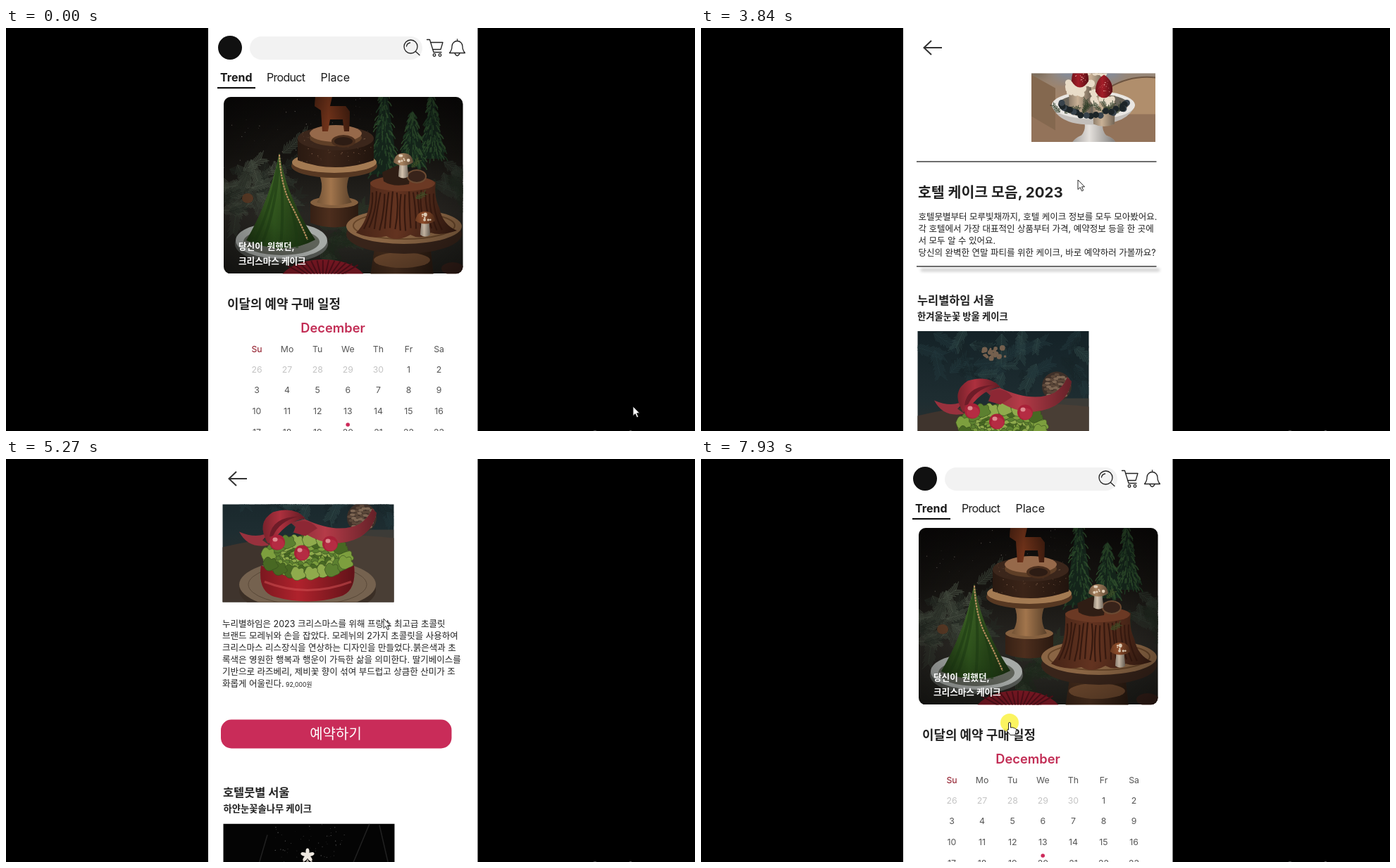
Write an HTML page that moves like this. It is 978 px wide and 573 px high and loops after 8000 ms.

```html
<!DOCTYPE html>
<html lang="ko">
<head>
<meta charset="utf-8">
<title>Cake app walkthrough</title>
<style>
html, body { margin: 0; width: 100%; height: 100%; overflow: hidden; background: #000; }
svg { display: block; }
text { font-family: Inter, "Noto Sans CJK KR", "Noto Sans CJK", sans-serif; white-space: pre; }
.script { font-family: "Liberation Serif", serif; font-style: italic; }
</style>
</head>
<body>
<svg id="stage" width="978" height="573" viewBox="0 0 978 573"></svg>
<script>
let seed = 7;
const rnd = (a = 0, b = 1) => {
  seed = (seed * 16807) % 2147483647;
  return a + (b - a) * seed / 2147483647;
};
const many = (n, make) => Array.from({ length: n }, (_, i) => make(i)).join('');

// Drawing helpers
const rect = (x, y, w, h, fill, more = '') =>
  `<rect x="${x}" y="${y}" width="${w}" height="${h}" fill="${fill}" ${more}/>`;
const oval = (x, y, rx, ry, fill, more = '') =>
  `<ellipse cx="${x}" cy="${y}" rx="${rx}" ry="${ry}" fill="${fill}" ${more}/>`;
const shape = (d, fill, more = '') => `<path d="${d}" fill="${fill}" ${more}/>`;
const lit = (d, fill) => shape(d, fill) + shape(d, 'url(#shade)');
const line = (d, stroke, width = 1, more = '') =>
  `<path d="${d}" fill="none" stroke="${stroke}" stroke-width="${width}" ${more}/>`;
const text = (x, y, size, str, weight = 400, fill = '#222', more = '') =>
  `<text x="${x}" y="${y}" font-size="${size}" font-weight="${weight}" fill="${fill}" ${more}>${str}</text>`;
const lines = (x, y, size, rows, weight, fill, step = 17) =>
  rows.map((row, i) => text(x, y + i * step, size, row, weight, fill)).join('');
const frame = (x, y, w, h, body) =>
  `<svg x="${x}" y="${y}" width="${w}" height="${h}" viewBox="${x} ${y} ${w} ${h}">${body}</svg>`;
const gradient = (id, ...colors) =>
  `<linearGradient id="${id}" x2="0" y2="1">${colors.map((c, i) =>
    `<stop offset="${i / (colors.length - 1)}" stop-color="${c}"/>`).join('')}</linearGradient>`;
const dots = (n, x, y, w, h, r, fill) =>
  many(n, () => { const s = rnd(.3, 1) * r; return oval(rnd(x, x + w), rnd(y, y + h), s, s, fill); });

// A fir sprig: needles leaning forward along a twig
function sprig(x, y, length, angle, color) {
  const needle = Math.min(14, length * .45);
  let d = `M${x} ${y}l${length * Math.cos(angle)} ${length * Math.sin(angle)}`;
  for (let s = 0; s < length; s += 2.5) {
    for (const side of [-.7, .7]) {
      const n = rnd(.6, 1) * needle;
      d += `M${x + s * Math.cos(angle)} ${y + s * Math.sin(angle)}l${n * Math.cos(angle + side)} ${n * Math.sin(angle + side)}`;
    }
  }
  return line(d, color, .9);
}
const sprigs = (n, x, y, w, h, colors) =>
  many(n, i => sprig(rnd(x, x + w), rnd(y, y + h), rnd(20, 45), rnd(-1, 2.2), colors[i % colors.length]));

// A slim fir with drooping tufts
function pine(x, top, half, bottom) {
  const tufts = tone => line(many(75, () => {
    const u = rnd(.04, 1), dx = rnd(-1, 1);
    return `M${x + dx * half * u} ${top + (bottom - top) * u}q${dx * 4} 2 ${dx * 6} 7`;
  }), tone, 1.4);
  return shape(`M${x} ${top}Q${x + half * .6} ${(top + bottom) / 2} ${x + half} ${bottom}h${-2 * half}Q${x - half * .6} ${(top + bottom) / 2} ${x} ${top}z`, '#14241a') +
    tufts('#1e3822') + tufts('#2b4829');
}

const mushroom = (x, y, cap) =>
  lit(`M${x - 5} ${y}l-2 24q7 5 14 0l-2-24z`, '#d3c2ae') +
  lit(`M${x - 14} ${y + 4}q2-13 14-13t14 13q-14 9-28 0z`, cap) + dots(8, x - 9, y - 6, 18, 9, 2.6, '#e2cfb8');

const hero = () => `<g clip-path="url(#heroClip)">` +
  rect(309, 98, 340, 251, 'url(#night)') +
  dots(60, 309, 98, 210, 110, .7, '#6b655e') +
  pine(605, 92, 18, 186) + pine(537, 66, 19, 208) + pine(577, 116, 20, 198) +
  sprigs(40, 296, 175, 100, 95, ['#363d33', '#242a23', '#464d41']) +
  sprigs(10, 605, 190, 40, 50, ['#2c342b', '#20281f']) +
  sprigs(16, 440, 280, 55, 50, ['#2a3626', '#1d271b']) +
  oval(343, 242, 8, 7, '#563824') +
  // Cake stand with chocolate cake and deer topper
  lit('M432 248v29q34 13 68 0v-29z', '#4d2e1d') + oval(466, 248, 34, 8, '#85603f') +
  lit('M442 203q13 24-1 45q25 8 50 0q-14-21 0-45z', '#a2754c') +
  oval(466, 196, 61, 17, '#573822') + oval(466, 191, 60, 15, '#a37a52') +
  lit('M414 156v32q53 20 108 0v-32z', '#3b2418') + oval(468, 157, 54, 17, '#3b261b') +
  dots(60, 420, 146, 98, 45, .7, '#7d5d47') +
  oval(468, 156, 37, 12, '#5f3f27') + oval(468, 150, 37, 12, '#96694a') +
  oval(479, 161, 17, 9, '#4a2e1d') + oval(479, 161, 13, 6, '#2d1c14') +
  lit('M439 98h24l-3 13h22l6 8-1 28h-7l-2-17h-18l-3 17h-8l-2-30-9-6z', '#71331a') +
  // Green cone cake
  oval(391, 307, 66, 27, '#555854') + oval(391, 302, 65, 26, '#a6aaa7') + oval(391, 304, 54, 19, '#5e6259') +
  lit('M388 177q9 62 51 124q-44 24-98 1q34-58 47-125z', 'url(#cone)') +
  line('M387 190q-3 66-24 118M390 200q5 67-1 117M385 200q-9 58-33 106M397 230q17 48 16 83', '#1c3a13', 4, 'opacity=".55"') +
  line('M388 180q2 43 16 70t24 51', '#b58d5e', 2.2, 'stroke-dasharray="3 1"') +
  // Log cake on a wood slice
  lit('M524 308h78l5 45h-90z', '#4c301f') + oval(562, 330, 40, 11, '#6b472d') +
  oval(565, 293, 82, 28, '#38241a') + oval(565, 282, 82, 25, '#8a6544') +
  oval(565, 281, 72, 19, 'none', 'stroke="#664529" stroke-width="2"') +
  lit('M517 219q46-19 93 0q-3 20 5 37q5 24 25 32q-24 8-37 3q-14 11-29 3q-20 11-34 2q-23 5-43-5q22-20 20-72z', '#633320') +
  oval(563, 221, 46, 11, '#6b3924') +
  line(many(16, i => `M${520 + i * 5.8} ${233 + rnd(-4, 4)}q${rnd(-5, 5)} 25 ${(i - 7.5) * 1.6} 52`), '#36190f', 2.2) +
  shape('M534 205l22-10 18 10-2 17q-22 5-36-4z', '#2f1d14') +
  oval(583, 211, 13, 9, '#38231a', 'stroke="#6c4a32" stroke-width="2"') +
  sprig(582, 242, 15, -.5, '#405229') + sprig(576, 198, 14, -.8, '#405229') +
  mushroom(564, 187, '#a8825f') + mushroom(595, 270, '#93502d') +
  oval(634, 342, 16, 9, '#38211a') +
  oval(450, 366, 64, 37, '#7d1824') +
  line(many(13, i => `M450 366L${400 + i * 8.3} ${338 - 8 * Math.sin(i / 4)}`), '#530f19', 2) +
  rect(309, 98, 340, 251, 'url(#vignette)') +
  lines(330, 314.5, 12.6, ['당신이  원했던,', '크리스마스 케이크'], 700, '#fff', 21.5) + '</g>';

function calendar() {
  const x = i => 356 + 43.1 * i;
  const cell = (i, y, str, fill) => text(x(i), y, 12.3, str, 400, fill, 'text-anchor="middle"');
  let out = text(464, 432.5, 18.3, 'December', 600, '#c22d55', 'text-anchor="middle"');
  ['Su', 'Mo', 'Tu', 'We', 'Th', 'Fr', 'Sa'].forEach((day, i) => { out += cell(i, 460.5, day, i ? '#555' : '#8c1020'); });
  for (let n = 0; n < 28; n++) {
    const past = n < 5;
    out += cell(n % 7, 489.5 + 29.8 * Math.floor(n / 7), past ? 26 + n : n - 4, past ? '#c4c4c4' : '#555');
  }
  return out + oval(485.2, 564, 2.8, 2.8, '#cd2a5a');
}

const home = () =>
  oval(318, 28, 17, 17, '#111') +
  rect(346, 12, 245, 33, '#f2f2f2', 'rx="16.5"') +
  `<g fill="none" stroke="#222" stroke-width="1.3" stroke-linecap="round" stroke-linejoin="round">
    <circle cx="574.5" cy="26.5" r="9.5"/><path d="M581.5 33.5l5.5 5M568.5 26a6 6 0 0 1 5-5"/>
    <path d="M597.5 16.5h4l5.5 18h11M602.5 20.5h17.5l-3 10h-11.5"/>
    <circle cx="608" cy="38.5" r="1.8"/><circle cx="616" cy="38.5" r="1.8"/>
    <path d="M629.5 35.5q3.5-4 3.5-9.5a7.5 7.5 0 0 1 15 0q0 5.5 3.5 9.5zM637 36q3.5 7 7 0M640.5 16v2"/></g>` +
  text(304, 75.5, 16, 'Trend', 700, '#1b1b1b') +
  text(370, 75.5, 16, 'Product', 400, '#1b1b1b', 'letter-spacing="-.7"') +
  text(446.5, 75.5, 16, 'Place', 400, '#1b1b1b') +
  rect(300, 84, 54, 2.2, '#111') + hero() +
  text(314, 398.5, 17.9, '이달의 예약 구매 일정', 700) + calendar();

const plate = (x, y, rx, ry) => oval(x, y + 3, rx, ry, '#3c1816') + oval(x, y, rx, ry, '#d5cec5') + oval(x, y, rx * .74, ry * .72, '#b5aaa0');
const toast = (x, y) => lit(`M${x - 18} ${y}l8-13h23l5 13-9 11h-21z`, '#5a301d') + dots(6, x - 12, y - 10, 25, 10, 4, '#932627') +
  oval(x - 7, y - 11, 5, 4, '#1f1411') + oval(x + 7, y - 11, 5, 4, '#1f1411');
const goblet = (x, y) => lit(`M${x - 11} ${y}h22q1 17-8 20l-1 11h5v3h-14v-3h5l-1-11q-9-4-8-20z`, '#b08844') + oval(x, y, 11, 4, '#c9a964');
const mug = (x, y) => oval(x, y + 19, 20, 6, '#aca096') + lit(`M${x - 15} ${y}h30l-4 20h-22z`, '#e2dacf') + dots(14, x - 13, y - 9, 26, 11, 5, '#c49c50');
const cushionText = (x, y, size, turn, str) => text(x, y, size, str, 400, '#e5ddd0', `class="script" transform="rotate(${turn} ${x} ${y})"`);

const partyPhoto = () => frame(308.5, 56, 243, 163,
  rect(308, 56, 244, 164, '#3b1a18') +
  rect(308, 118, 244, 102, '#5f1a1c') + rect(308, 118, 244, 102, 'url(#plaid)') +
  shape('M366 56h116v62h-116z', '#47302c') + rect(366, 56, 116, 62, 'url(#plaid)') +
  shape('M308 60h54l3 57q-25 16-57 9z', '#12352a') + shape('M506 60h46v63q-36 5-57-12z', '#751420') +
  shape('M488 56h18l-8 44h-12z', '#94877f') + rect(385, 66, 3, 58, '#8d2526') + rect(484, 64, 3, 60, '#a33a32') +
  cushionText(318, 109, 17, -9, 'lalala') + cushionText(513, 91, 14, 22, 'Holiday') +
  lit('M416 66h9v22q5 5 5 12v28h-20v-28q0-7 6-12z', '#1b211d') + rect(415, 64, 11, 14, '#a22b2b') + rect(411, 104, 18, 14, '#b5a28f') +
  lit('M452 80l12 53h-25z', '#bd984c') + line('M447 101l12 5M444 112l16 5M442 123l20 5', '#6f501f', 2) +
  goblet(340, 102) + goblet(529, 130) +
  dots(16, 360, 140, 150, 20, 7, '#8b6d37') +
  plate(430, 142, 31, 15) + oval(430, 142, 21, 9, '#73502b') +
  oval(380, 160, 23, 15, '#2f3b22') + dots(26, 361, 148, 40, 23, 4, '#8d2c2c') + dots(14, 361, 148, 40, 23, 3, '#8d8a55') +
  plate(487, 162, 24, 14) + dots(34, 470, 152, 34, 20, 4, '#96302a') + dots(12, 470, 152, 34, 20, 3, '#d3c2ae') +
  oval(436, 176, 38, 14, '#2c2f1d') + sprigs(15, 400, 165, 42, 16, ['#474a2b', '#26351f']) +
  dots(16, 405, 164, 60, 22, 4, '#a32b2a') + oval(433, 167, 11, 10, '#d57a27') + oval(433, 164, 5, 5, '#ffd86b') +
  mug(333, 165) + mug(537, 168) +
  plate(322, 205, 20, 15) + plate(372, 201, 31, 18) + plate(440, 209, 29, 15) + plate(500, 199, 31, 18) + plate(547, 205, 19, 14) +
  toast(371, 201) + toast(500, 200) + lit('M423 211l8-11 26 5-4 12z', '#b08a57'));

const berryCake = (x, y) =>
  lit(`M${x - 16} ${y + 14}l1 40q15 7 30 0l1-40z`, '#c9b196') +
  dots(26, x - 17, y + 10, 34, 17, 6, '#e9dcc8') +
  lit(`M${x} ${y - 16}q13 8 12 24q-5 9-12 9t-12-9q0-17 12-24z`, '#a31d28') + dots(18, x - 8, y - 8, 16, 18, .8, '#e9aaa0');

const berryPhoto = () => frame(469, 409.5, 176, 176,
  rect(469, 409, 176, 177, 'url(#dusk)') +
  `<g filter="url(#blur)">${rect(505, 400, 90, 95, '#7f8ea6')}${rect(462, 400, 26, 90, '#5e5242')}${rect(520, 400, 60, 22, '#4d4a38')}${rect(612, 400, 40, 88, '#988c82')}</g>` +
  `<g opacity=".5">${dots(34, 505, 411, 90, 44, 4, '#d6b45e')}</g>` +
  shape('M580 508q26-19 66-14v92h-66z', '#b08e6c') + rect(469, 546, 176, 40, '#93735a') +
  shape('M469 490l34 19v60l-34-20z', '#84684f') + line('M580 508q30-18 66-14', '#6d5541', 2) +
  lit('M543 553h29q-5 14 3 23q13 5 14 12h-63q3-7 14-12q8-9 3-23z', '#e4e0dc') +
  shape('M498 533h118q-9 27-59 28t-59-28z', '#c3bfbb') +
  oval(557, 533, 59, 20, '#e9e6e2') + oval(557, 532, 50, 15, '#6b655a') +
  berryCake(556, 461) + berryCake(538, 491) + berryCake(572, 506) +
  many(11, () => sprig(rnd(505, 595), rnd(536, 546), 14, rnd(-2.6, -.4), '#33402b')) +
  many(22, i => oval(557 + rnd(43, 52) * Math.cos(i * .15), 530 + rnd(12, 19) * Math.sin(i * .15), 4.5, 4.5, i % 3 ? '#1d2528' : '#38434c')));

function leaves(x, y, n) {
  return many(n, i => {
    const a = i * 2.4, r = Math.sqrt(i / n), tone = ['#5c8030', '#7d9f3e', '#486823', '#8fab4c'][i % 4];
    return shape(`M${x + 58 * r * Math.cos(a)} ${y + 25 * r * Math.sin(a)}q5-15 12-6q8-4 7 5q7 6-3 9q-12 8-16-8z`, tone, 'stroke="#33491c" stroke-width=".6"');
  });
}
const bauble = (x, y) => oval(x, y, 11, 11, '#a82138') + oval(x + 1, y + 2, 9, 8, '#b52c43') + oval(x - 3, y - 4, 3.5, 3, '#df8a90');

const potPhoto = () => frame(307.5, 854.5, 243, 198.5,
  rect(307, 854, 244, 200, 'url(#teal)') +
  sprigs(36, 300, 846, 240, 75, ['#22373b', '#2d4444', '#182529']) +
  shape('M307 975q110-27 244-13v92h-244z', '#3f342d') + rect(480, 950, 71, 103, '#51453b', 'opacity=".6"') +
  dots(24, 400, 878, 32, 16, 4, '#75604e') +
  oval(505, 933, 21, 21, '#3d2f28') + many(40, i => oval(505 + 2.8 * Math.sqrt(i) * Math.cos(i * 2.4), 933 + 2.8 * Math.sqrt(i) * Math.sin(i * 2.4), 3.5, 2, i % 2 ? '#7d6653' : '#5b4739')) +
  oval(428, 1036, 97, 37, '#3b2f26') + oval(428, 1028, 97, 36, '#75624f') + oval(428, 1028, 84, 29, 'none', 'stroke="#594838"') +
  lit('M362 1001q65 28 132 0q4 37-20 44q-45 14-94 0q-23-8-18-44z', '#b0222c') +
  line('M367 1024q60 24 123 0', '#d85658', 3, 'opacity=".5"') +
  leaves(417, 988, 100) +
  shape('M331 953q28 12 46-2l-13 14 10 7q-30 6-43-19z', '#98313d') +
  lit('M372 970q-18-30 7-45q30-9 46 9q-24 3-42 27z', '#ad303e') + shape('M374 960q3-28 42-29q-28 7-37 28z', '#6d1c28') +
  lit('M424 935q47 22 78 7q13-9 18-22l6 6q-7 38-53 43q-35 2-69-29z', '#b53b48') +
  shape('M413 940q17-7 29 8l-17 11-17-5z', '#8d2734') +
  bauble(385, 968) + bauble(420, 983) + bauble(460, 970));

function creamTree() {
  let out = shape('M428 1418L366 1545h124z', '#a79f95');
  for (let row = 9; row >= 0; row--) {
    const y = 1421 + row * 13.5, half = 5 + row * 6, n = 2 + row;
    for (let i = 0; i <= n; i++) {
      const u = i / n * 2 - 1, x = 428 + u * half;
      out += shape(`M${x} ${y}q${-9 - row * .4 + u * 6} 12 ${u * 9} 23q${11 + row * .4} -10 ${-u * 9} -23z`,
        (i + row) % 3 ? '#e7e1d8' : '#c8c0b6', 'stroke="#8c857d" stroke-width=".7"');
    }
  }
  return out;
}

const treePhoto = () => frame(308.5, 1368, 243, 243,
  rect(308, 1368, 244, 244, '#040404') +
  line('M371 1384L337 1500M486 1440L516 1368M530 1370l22 95', '#343434', 1.5, 'opacity=".6"') +
  dots(60, 375, 1368, 110, 60, .7, '#5c5c5c') +
  many(5, i => oval(428, 1540, 72 + i * 11, 13 + i * 3, 'none', 'stroke="#444" stroke-width=".7"')) +
  creamTree() +
  many(5, i => oval(428, 1408, 2.6, 5, '#eee8e0', `transform="rotate(${i * 72} 428 1413)"`)) +
  dots(7, 395, 1440, 65, 75, 2, '#1a1a1a') +
  rect(413, 1462, 33, 6, '#111') + text(429.5, 1466.5, 3, 'HAPPY HOLIDAYS', 400, '#ccc', 'text-anchor="middle"'));

const article = () =>
  partyPhoto() +
  lines(308.5, 265.4, 13, ['당신의 완벽한', '크리스마스 파티를 위한,', '케이크 모음'], 700) +
  lines(309.5, 329.5, 13.25, ['완벽한 연말파티를 위해서는 완벽한 케이크가 필요하다.', '가성비보다 가심비가 트렌드인 시대. 맛은 당연하고 사진에',
    '잘나오는 멋진 비주얼도 중요하다. 퍼펙트한 비주얼의 호텔', '케이크부터, 톡톡튀는 개성의 케이크까지 모두 모아보았다.']) +
  berryPhoto() +
  rect(306, 612.8, 340.5, 1.3, '#222') +
  text(308, 664.5, 20.5, '호텔 케이크 모음, 2023', 700) +
  lines(308.5, 696.2, 12.5, ['호텔뭇별부터 모루빛채까지, 호텔 케이크 정보를 모두 모아봤어요.', '각 호텔에서 가장 대표적인 상품부터 가격, 예약정보 등을 한 곳에',
    '서 모두 알 수 있어요.', '당신의 완벽한 연말 파티를 위한 케이크, 바로 예약하러 가볼까요?']) +
  rect(312, 765.5, 339, 4, '#000', 'opacity=".22" filter="url(#soft)"') + rect(306, 761.8, 340.5, 1.3, '#222') +
  text(307, 816, 16.4, '누리별하임 서울', 700) + text(307, 838, 13.3, '한겨울눈꽃 방울 케이크', 700) +
  potPhoto() +
  lines(307, 1088.3, 12.5, ['누리별하임은 2023 크리스마스를 위해 프랑스 최고급 초콜릿', '브랜드 모레뉘와 손을 잡았다. 모레뉘의 2가지 초콜릿을 사용하여',
    '크리스마스 리스장식을 연상하는 디자인을 만들었다.붉은색과 초', '록색은 영원한 행복과 행운이 가득한 삶을 의미한다. 딸기베이스를',
    '기반으로 라즈베리, 제비꽃 향이 섞여 부드럽고 상큼한 산미가 조', '화롭게 어울린다.']) +
  text(397, 1173.3, 8.7, '92,000원') +
  rect(305, 1220, 327.5, 41, '#c92c59', 'rx="15"') +
  text(468, 1247.5, 20, '예약하기', 400, '#fff', 'text-anchor="middle"') +
  text(308, 1329, 16.4, '호텔뭇별 서울', 700) + text(308.5, 1351.7, 13.3, '하얀눈꽃솔나무 케이크', 700) +
  treePhoto();

const stage = document.getElementById('stage');
stage.innerHTML = `<defs>
  ${gradient('night', '#0c0a09', '#151310', '#282622', '#1f1f1b')}
  ${gradient('cone', '#43682b', '#34591f', '#264818')}
  ${gradient('dusk', '#6a5c4a', '#8f8478', '#a3846a', '#93735a')}
  ${gradient('teal', '#142227', '#1e2d31', '#38332e')}
  <linearGradient id="shade"><stop offset="0" stop-opacity=".3"/><stop offset=".4" stop-opacity="0"/><stop offset="1" stop-opacity=".45"/></linearGradient>
  <radialGradient id="vignette" r=".72"><stop offset=".5" stop-opacity="0"/><stop offset="1" stop-opacity=".45"/></radialGradient>
  <clipPath id="heroClip"><rect x="309" y="98" width="339.5" height="251.5" rx="10"/></clipPath>
  <pattern id="plaid" width="18" height="16" patternUnits="userSpaceOnUse"><path d="M4 0V16M0 5H18" stroke="#1c2a22" stroke-width="4" opacity=".6"/><path d="M12 0V16M0 12H18" stroke="#b77b58" stroke-width=".7" opacity=".7"/></pattern>
  <filter id="blur"><feGaussianBlur stdDeviation="9"/></filter>
  <filter id="soft" x="-5%" y="-200%" width="110%" height="500%"><feGaussianBlur stdDeviation="2"/></filter>
</defs>` +
  rect(0, 0, 978, 573, '#000') + rect(287, 0, 382.5, 573, '#fff') +
  rect(834, 572, 4, 1, '#444') + rect(885, 572, 3, 1, '#555') +
  `<g id="home">${home()}</g>
  <g id="article">${line('M342 28H316.5M327 18L316.5 28l10.5 10', '#333', 2)}
    ${frame(287, 64.5, 382.5, 509, `<g id="scroll">${article()}</g>`)}</g>
  <g id="cursor">
    <circle id="press" r="13" fill="#fbf24a" opacity=".88"/>
    <g fill="#fff" stroke="#111" stroke-width=".9" stroke-linejoin="round">
      <path id="arrow" d="M0 0V13.5L3.2 10.6 5.5 15.8 7.7 14.8 5.5 9.8H9.5Z"/>
      <path id="hand" d="M-1.5 10V1a1.5 1.5 0 0 1 3 0V7l2.5-.3 2.5.8 2.2 1q1 .5.8 2l-.8 4.5-1 2.5H1l-4.5-6q.2-2.5 2-1.5z"/>
    </g></g>`;

const part = Object.fromEntries(['home', 'article', 'scroll', 'cursor', 'press', 'arrow', 'hand'].map(id => [id, document.getElementById(id)]));

// Keyframes: [ms, value, ...]
const scrollKeys = [[0, -8], [2300, -8], [2500, 150], [2700, 480], [2880, 780], [3020, 955], [3230, 1010], [3370, 1010],
  [3600, 800], [3840, 425], [4000, 180], [4180, 35], [4400, 2], [4600, -8], [4800, -8], [4860, 0], [4930, 80], [5000, 240],
  [5130, 240], [5200, 640], [5270, 849], [5500, 960], [5970, 1010], [8000, 1010]];
const cursorKeys = [[0, 890, 538], [65, 890, 538], [70, 878, 548], [400, 878, 548], [1190, 386, 83], [1330, 394, 77],
  [1500, 394, 77], [1750, 452, 171], [2090, 452, 171], [2700, 533, 211], [3020, 533, 211], [3840, 535, 216], [4600, 542, 221],
  [4860, 542, 221], [5200, 536, 227], [5970, 536, 227], [6200, 330, 28], [6380, 330, 28], [6640, 381, 67], [6770, 436, 127],
  [7000, 467, 175], [7470, 466, 222], [7650, 466, 222], [7800, 432, 320], [7930, 438, 375], [8000, 438, 375]];
const linear = u => u, smooth = u => u * u * (3 - 2 * u);

function sample(keys, t, ease) {
  const i = keys.findIndex(k => k[0] > t), a = keys[i - 1], b = keys[i];
  const u = ease((t - a[0]) / (b[0] - a[0]));
  return a.slice(1).map((v, n) => v + (b[n + 1] - v) * u);
}
const during = (t, ...spans) => spans.some(([from, to]) => t >= from && t < to);
const show = (node, on) => node.setAttribute('display', on ? 'inline' : 'none');

function render(t) {
  const reading = during(t, [2090, 6350]);
  const pointing = during(t, [1700, 2090], [6180, 6350], [6770, 8000]);
  const [x, y] = sample(cursorKeys, t, smooth);
  show(part.home, !reading);
  show(part.article, reading);
  show(part.press, during(t, [1950, 2090], [6250, 6350], [7650, 8000]));
  show(part.arrow, !pointing);
  show(part.hand, pointing);
  part.scroll.setAttribute('transform', `translate(0 ${-sample(scrollKeys, t, linear)[0]})`);
  part.cursor.setAttribute('transform', `translate(${x} ${y})`);
}

const start = performance.now();
function tick() {
  render((performance.now() - start) % 8000);
  requestAnimationFrame(tick);
}
tick();
</script>
</body>
</html>
```
